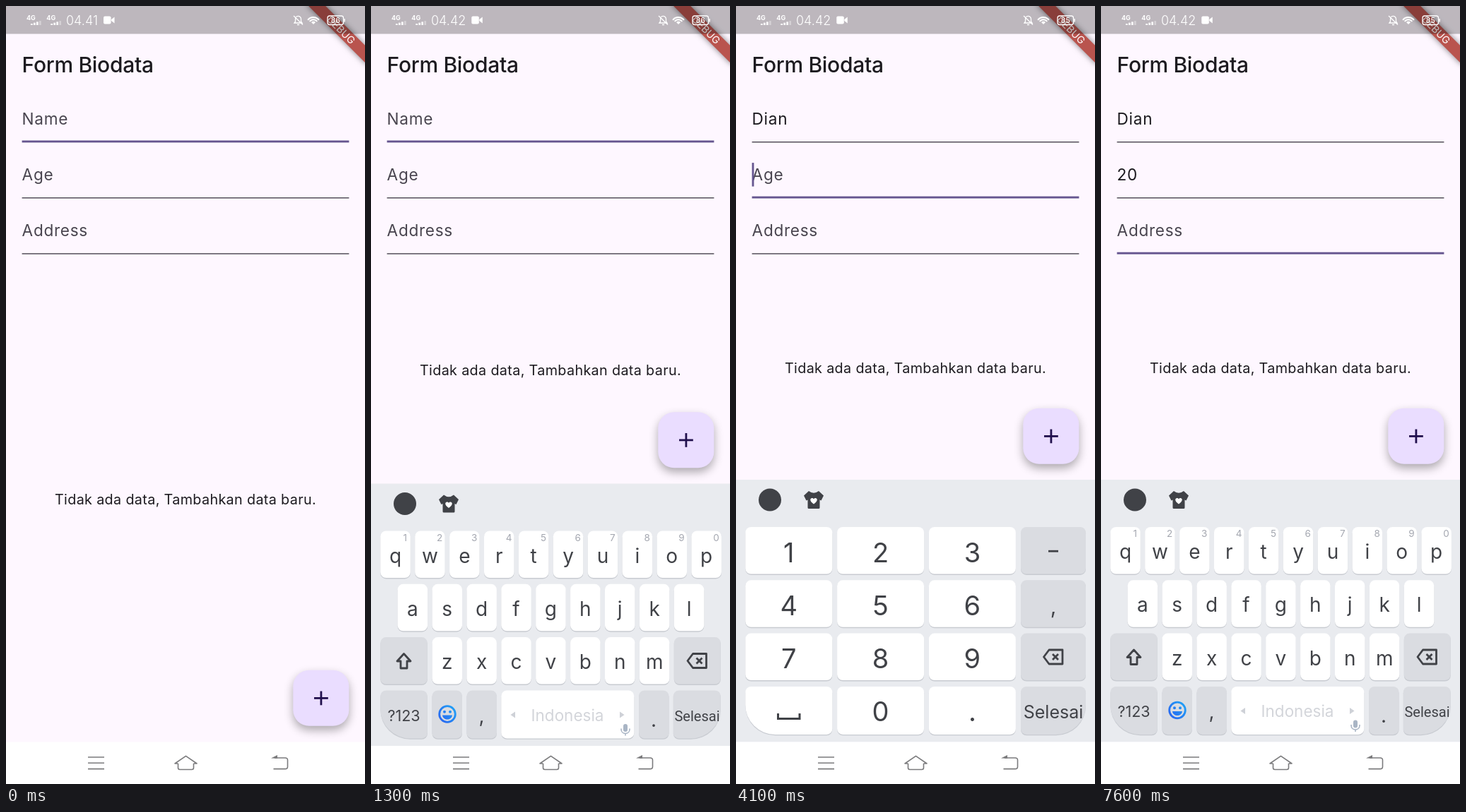
Write an HTML page with a canvas that moves like this. It is 508x1102 px and loops after 8000 ms.

```html
<!DOCTYPE html>
<html lang="id">
<head>
<meta charset="utf-8">
<title>Form Biodata</title>
<style>
html, body { margin: 0; width: 100%; height: 100%; overflow: hidden; background: #fff; }
canvas { display: block; width: 508px; height: 1102px; }
</style>
</head>
<body>
<canvas id="stage" width="508" height="1102"></canvas>
<script>
const ctx = document.getElementById('stage').getContext('2d');
const W = 508, H = 1102, LOOP = 8000, NAV_TOP = 1042.5, KB_TOP = 671, KB_H = 371;
const INK = '#1d1b20', LABEL = '#49454f', PURPLE = '#65558f', KEY_INK = '#404247', GRAY_KEY = '#dadce1';
const LEFT = 22.6, RIGHT = 485.4;
const PITCH = 48.9, KEY_W = 42.5, KEY_H = 66.5;
const ROWS = [738, 813.3, 888.6, 963.9];

// Touches: from, to, x, y, pressed key
const TOUCHES = [
  [1000, 1200, 84, 166],
  [2000, 2200, 34, 915, 'shift'],
  [2300, 2500, 160, 845, 'd'],
  [2500, 2700, 381, 768, 'i'],
  [2700, 2900, 62, 845, 'a'],
  [2900, 3100, 359, 915, 'n'],
  [3800, 4100, 62, 238],
  [5300, 5500, 208, 774, '2'],
  [5900, 6200, 201, 1000],
  [7000, 7300, 76, 318]
];
const CARETS = [
  [500, 1000, 0], [1500, 2000, 0], [2400, 3500, 0],
  [3900, 4400, 1], [4900, 5900, 1], [6000, 6500, 1], [7000, 7100, 1],
  [7100, 7600, 2]
];
const FIELDS = [
  { label: 'Name', value: 'Dian', typed: [2400, 2600, 2800, 3000] },
  { label: 'Age', value: '20', typed: [5400, 6000] },
  { label: 'Address', value: '', typed: [] }
];
const SUGGESTIONS = [
  ['D', 'Dan', 'Dari', 'Dia', 'Di'],
  ['Di', 'Dia', 'Dari', 'Itu', 'Dan'],
  ['Dia', 'Juga', 'Nya', 'Iya', 'Jadi'],
  ['Dian', 'Dia', 'Nya', 'Iya', 'Jadi']
];

const within = (t, span) => t >= span[0] && t < span[1];
const typedCount = (field, t) => field.typed.filter(at => t >= at).length;

function text(str, x, y, size, color, { align = 'left', weight = 400, spacing = 0, family = 'Inter' } = {}) {
  ctx.font = `${weight} ${size}px ${family}, sans-serif`;
  ctx.letterSpacing = spacing + 'px';
  ctx.textAlign = align;
  ctx.fillStyle = color;
  ctx.fillText(str, x, y);
  return ctx.measureText(str).width;
}

function rect(x, y, w, h, color) {
  ctx.fillStyle = color;
  ctx.fillRect(x, y, w, h);
}

function round(x, y, w, h, r, color) {
  ctx.beginPath();
  ctx.roundRect(x, y, w, h, r);
  ctx.fillStyle = color;
  ctx.fill();
}

function circle(x, y, r, color) {
  ctx.beginPath();
  ctx.arc(x, y, r, 0, Math.PI * 2);
  ctx.fillStyle = color;
  ctx.fill();
}

function stroke(d, color, width, join = 'miter') {
  ctx.strokeStyle = color;
  ctx.lineWidth = width;
  ctx.lineJoin = join;
  ctx.stroke(new Path2D(d));
}

function fill(d, color) {
  ctx.fillStyle = color;
  ctx.fill(new Path2D(d));
}

function at(x, y, draw) {
  ctx.save();
  ctx.translate(x, y);
  draw();
  ctx.restore();
}

function drawFields(t) {
  const focus = t < 3900 ? 0 : t < 7100 ? 1 : 2;
  FIELDS.forEach((field, i) => {
    const top = i * 79.1, bottom = 193.4 + top;
    const value = field.value.slice(0, typedCount(field, t));
    const width = text(value || field.label, LEFT, 168 + top, 22.6, value ? INK : LABEL, { spacing: 0.7 });
    const composing = i === 0 && value && t < 3900;
    if (composing) rect(LEFT, 169.5, width, 1.4, INK);
    const thick = i === focus ? 2.9 : 1.4;
    rect(LEFT, bottom - thick, RIGHT - LEFT, thick, i === focus ? PURPLE : LABEL);
    if (CARETS.some(c => c[2] === i && within(t, c)))
      rect(LEFT + (value ? width : 0), 143 + top, 2.8, 33.5, PURPLE);
  });
}

function drawFab(y) {
  ctx.save();
  ctx.shadowColor = 'rgba(0,0,0,0.32)';
  ctx.shadowBlur = 13;
  ctx.shadowOffsetY = 6;
  round(406.3, y, 79, 79, 22.6, '#eaddff');
  ctx.restore();
  rect(436, y + 38.2, 19.8, 2.8, '#21104d');
  rect(444.5, y + 29.7, 2.8, 19.8, '#21104d');
}

function drawBanner() {
  at(W, 0, () => {
    ctx.rotate(Math.PI / 4);
    ctx.save();
    ctx.shadowColor = 'rgba(0,0,0,0.5)';
    ctx.shadowBlur = 9;
    rect(-60, 39.5, 120, 17, '#b9544e');
    ctx.restore();
    text('DEBUG', 0, 53, 14.2, '#fff', { align: 'center' });
  });
}

function drawStatus(t) {
  rect(0, 0, W, 39.5, 'rgba(0,0,0,0.26)');
  for (const x of [29, 57.3]) {
    text('4G', x, 20, 9, '#fff', { weight: 700 });
    for (let i = 0; i < 4; i++)
      rect(x + 6 + i * 4, 25 - i * 1.3, 2.7, 2 + i * 1.3, i < 3 ? '#fff' : 'rgba(255,255,255,0.35)');
  }
  const end = 85 + text(t < 1200 ? '04.41' : '04.42', 85, 27, 18, '#fff', { weight: 300 });
  at(end + 8, 0, () => {
    round(0, 14.5, 10.5, 11, 2, '#fff');
    fill('M11 19 L15.5 15.5 V24.5 L11 21Z', '#fff');
  });
  at(413.5, 20, () => {
    stroke('M-5.5 4 H5.5 L4 2 V-1.5 C4 -7 -4 -7 -4 -1.5 V2 Z M-1.5 6.5 H1.5 M-6.5 -6 L6.5 6.5', '#fff', 1.3);
  });
  at(435, 26, () => {
    for (const r of [10, 6.7]) {
      ctx.beginPath();
      ctx.arc(0, 0, r, -Math.PI * 0.79, -Math.PI * 0.21);
      ctx.strokeStyle = '#fff';
      ctx.lineWidth = 2;
      ctx.stroke();
    }
    fill('M0 0 L-3 -3 Q0 -5.5 3 -3Z', '#fff');
  });
  ctx.beginPath();
  ctx.roundRect(455, 14, 22.5, 12.5, 3);
  ctx.strokeStyle = '#fff';
  ctx.lineWidth = 1.3;
  ctx.stroke();
  rect(478.3, 18, 1.5, 4.5, '#fff');
  text(t < 2400 ? '86' : '85', 466.3, 24, 10.5, '#fff', { align: 'center', weight: 500 });
}

function drawNav() {
  const gray = '#7b7b7d';
  stroke('M116 1064 H139 M116 1072.3 H139 M116 1080.6 H139', gray, 1.6);
  stroke('M243.5 1073 H239 L254.5 1062.3 L270 1073 H265.5 M243.5 1073 V1079 Q243.5 1081.5 246 1081.5 H263 Q265.5 1081.5 265.5 1079 V1073', gray, 1.6, 'round');
  stroke('M380 1065 H395 Q398.5 1065 398.5 1068 V1077.5 Q398.5 1080.6 395 1080.6 H378.5', gray, 1.6);
  fill('M375 1065.5 L384 1061 V1065.8Z', gray);
}

function drawKey(x, y, w, { color = '#fff', corners = 8, pressed = false, h = KEY_H } = {}) {
  round(x, y + 1.4, w, h, corners, '#c8cbd1');
  round(x, y, w, h, corners, pressed ? (color === '#fff' ? '#e6e8ec' : '#c9ccd3') : color);
}

function drawBackspace(x) {
  at(x, 922, () => {
    stroke('M-13.5 0 L-6 -10 H13 V10 H-6 Z', KEY_INK, 2.8, 'round');
    stroke('M-1 -4 L7 4 M7 -4 L-1 4', KEY_INK, 2.8);
  });
}

function drawToolbar() {
  circle(48, 699.5, 16, KEY_INK);
  at(110, 699.5, () => {
    fill('M-7 -12.5 Q0 -7 7 -12.5 L14 -6 L10.5 1 L8.5 0 V11 Q8.5 12.5 7 12.5 H-7 Q-8.5 12.5 -8.5 11 V0 L-10.5 1 L-14 -6 Z', KEY_INK);
    fill('M0 6 C-9 0 -3 -5 0 -1.2 C3 -5 9 0 0 6Z', '#fff');
  });
}

function drawSuggestions(words) {
  let x = 18;
  for (const word of words) {
    x += text(word, x, 713, 25.3, KEY_INK) + 18;
    rect(x, 677, 1.3, 45, '#c4c7cc');
    x += 18;
  }
  stroke('M450 694 L459.5 703.5 L469 694', KEY_INK, 3);
}

function drawEmoji() {
  at(108, 997.5, () => {
    const blue = ctx.createLinearGradient(-12, 10, 12, -10);
    blue.addColorStop(0, '#2a63f0');
    blue.addColorStop(1, '#1fa4f6');
    ctx.beginPath();
    ctx.arc(0, 0, 11.3, 0, Math.PI * 2);
    ctx.strokeStyle = blue;
    ctx.lineWidth = 2.8;
    ctx.stroke();
    circle(-4, -3.2, 2, blue);
    circle(4, -3.2, 2, blue);
    fill('M-7 1.5 H7 C6 9.5 -6 9.5 -7 1.5Z', blue);
  });
}

function drawLetters(pressed, caps) {
  const letterRow = (letters, left, y, hints) => [...letters].forEach((ch, i) => {
    const x = left + i * PITCH;
    drawKey(x, y, KEY_W, { pressed: pressed === ch });
    text(caps ? ch.toUpperCase() : ch, x + KEY_W / 2, y + 45, 28, KEY_INK, { align: 'center' });
    if (hints) text(hints[i], x + 35, y + 14, 13.5, '#a4a7b0', { align: 'center' });
  });
  const gray = { color: GRAY_KEY };
  letterRow('qwertyuiop', 13.3, ROWS[0], '1234567890');
  letterRow('asdfghjkl', 37.6, ROWS[1]);
  letterRow('zxcvbnm', 86.5, ROWS[2]);

  drawKey(13.3, ROWS[2], 66.5, { ...gray, pressed: pressed === 'shift' });
  const arrow = 'M46.5 912 L56 922.5 H51 V932.5 H42 V922.5 H37 Z';
  if (caps) fill(arrow, KEY_INK);
  stroke(arrow, KEY_INK, 2.8, 'round');
  drawKey(428.8, ROWS[2], 66, gray);
  drawBackspace(461.5);

  const y = ROWS[3], h = 68;
  drawKey(13.3, y, 66.5, { ...gray, h, corners: [8, 8, 8, 42] });
  text('?123', 46.5, 1007, 21.5, KEY_INK, { align: 'center' });
  drawKey(86.5, y, KEY_W, { ...gray, h });
  drawEmoji();
  drawKey(135.5, y, KEY_W, { ...gray, h });
  text(',', 156.5, 1009, 28, KEY_INK, { align: 'center' });
  drawKey(184.3, y, 188, { h });
  text('Indonesia', 278, 1007, 22.5, '#d3d5da', { align: 'center' });
  fill('M204 994 V1003 L197.5 998.5Z M352 994 V1003 L358.5 998.5Z', '#ced1d7');
  round(357, 1011.5, 6, 11, 3, '#a9b5c5');
  stroke('M354 1018 V1019 C354 1027 366 1027 366 1019 V1018 M360 1025 V1028', '#a9b5c5', 1.6);
  drawKey(379, y, KEY_W, { ...gray, h });
  text('.', 400, 1015, 28, KEY_INK, { align: 'center' });
  drawKey(427.8, y, 67, { ...gray, h, corners: [8, 8, 42, 8] });
  text('Selesai', 461.5, 1007, 20, KEY_INK, { align: 'center', family: 'Roboto' });
}

function drawNumbers(pressed) {
  ['123', '456', '789', ' 0.'].forEach((row, r) => {
    const y = ROWS[r], last = r === 3, h = last ? 68 : KEY_H;
    [...row].forEach((ch, c) => {
      const x = 13.3 + c * 129.8;
      drawKey(x, y, 123, { h, pressed: pressed === ch, corners: last && c === 0 ? [8, 8, 8, 42] : 8 });
      text(ch, x + 61.5, y + 49.5, 38, KEY_INK, { align: 'center' });
    });
    drawKey(403, y, 92, { h, color: GRAY_KEY, corners: last ? [8, 8, 42, 8] : 8 });
  });
  stroke('M59.5 1002 V1009.5 H90 V1002', KEY_INK, 3);
  rect(442, 770.8, 14, 2.8, KEY_INK);
  text(',', 449, 861, 30, KEY_INK, { align: 'center' });
  drawBackspace(449);
  text('Selesai', 449, 1008.5, 25, KEY_INK, { align: 'center' });
}

function drawKeyboard(t, drop, pressed) {
  at(0, drop, () => {
    rect(0, KB_TOP, W, KB_H + 0.5, '#e9ebef');
    rect(0, NAV_TOP, W, H - NAV_TOP, '#fff');
    const suggesting = t >= 2400 && t < 4000;
    if (suggesting) drawSuggestions(SUGGESTIONS[typedCount(FIELDS[0], t) - 1]);
    else drawToolbar();
    if (t >= 4000 && t < 7200) drawNumbers(pressed);
    else drawLetters(pressed, t >= 2100 && t < 2400);
  });
}

function drawTouch([, , x, y]) {
  circle(x, y, 13.5, 'rgba(255,255,255,0.6)');
  ctx.beginPath();
  ctx.arc(x, y, 13.5, 0, Math.PI * 2);
  ctx.strokeStyle = 'rgba(245,214,170,0.75)';
  ctx.lineWidth = 2;
  ctx.stroke();
}

function draw(t) {
  const progress = Math.min(1, Math.max(0, (t - 1050) / 300));
  const lift = KB_H * (1 - (1 - progress) ** 2.35);
  const touch = TOUCHES.find(span => within(t, span));

  rect(0, 0, W, H, '#fef7ff');
  text('Form Biodata', LEFT, 94, 30, INK, { weight: 500, spacing: -0.3 });
  drawFields(t);
  text('Tidak ada data, Tambahkan data baru.', W / 2, 705.5 - lift / 2, 19.75, INK, { align: 'center', spacing: 0.35 });
  drawFab(940.8 - lift);
  drawBanner();
  drawStatus(t);
  rect(0, NAV_TOP, W, H - NAV_TOP, '#fff');
  if (lift > 0) drawKeyboard(t, KB_H - lift, touch && touch[4]);
  drawNav();
  if (touch) drawTouch(touch);
}

function tick() {
  draw(Math.floor(performance.now() % LOOP / 100) * 100);
  requestAnimationFrame(tick);
}
tick();
</script>
</body>
</html>
```
